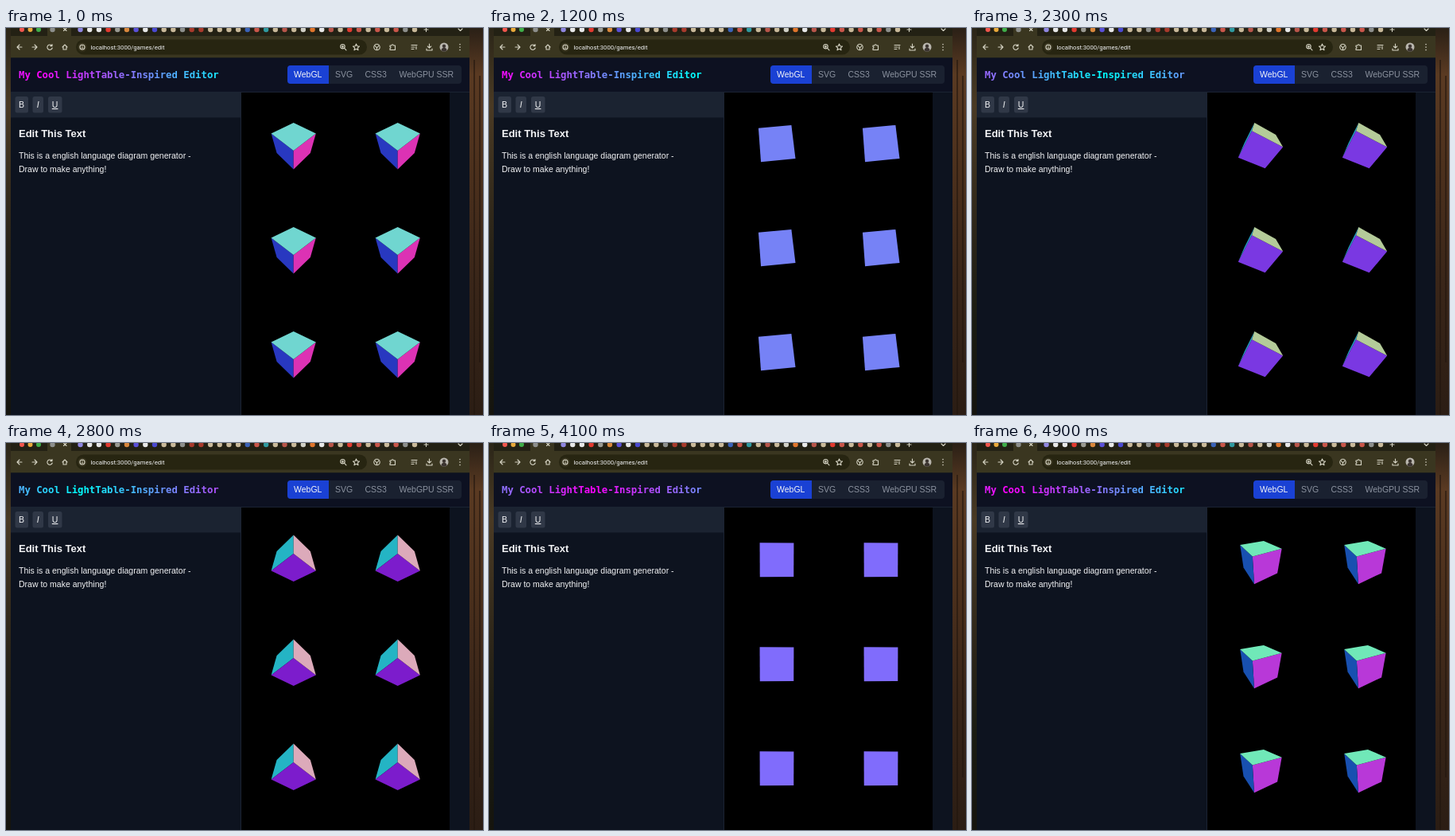
Write an HTML page that moves like this. It is 600 px wide and 486 px high and loops after 5 s.

```html
<!DOCTYPE html>
<html lang="en">
<head>
<meta charset="utf-8">
<title>Editor</title>
<style>
  html, body { margin: 0; width: 100%; height: 100%; overflow: hidden; background: #0d131f; }
  svg { position: absolute; left: 0; top: 0; display: block; }
  text { font-family: "Liberation Sans", Arial, sans-serif; font-size: 10.5px; fill: #f3f4f6; }
  #title {
    position: absolute; left: 16px; top: 50.5px; width: 252px; white-space: nowrap;
    font: bold 12.31px/16px "DejaVu Sans Mono", monospace;
    background: linear-gradient(90deg, #f0f, #0ff, #f0f) 0 0 / 504px 100%;
    -webkit-background-clip: text; background-clip: text; color: transparent;
  }
  .idle { fill: #8b929f; }
  .icon { fill: none; stroke: #d6d4c4; stroke-width: 1.1; stroke-linecap: round; stroke-linejoin: round; }
</style>
</head>
<body>
<svg width="600" height="486" viewBox="0 0 600 486">
  <defs>
    <linearGradient id="bark" x2="0" y2="1">
      <stop offset="0" stop-color="#2a2016"/><stop offset=".12" stop-color="#5a3a22"/>
      <stop offset=".4" stop-color="#4a2f1c"/><stop offset=".65" stop-color="#3a2619"/>
      <stop offset="1" stop-color="#2b1d14"/>
    </linearGradient>
    <linearGradient id="moss" x2="0" y2="1">
      <stop offset="0" stop-color="#2b2618"/><stop offset=".2" stop-color="#4a3a24"/>
      <stop offset=".55" stop-color="#2a2418"/><stop offset=".75" stop-color="#1a1c12"/>
      <stop offset="1" stop-color="#15140e"/>
    </linearGradient>
    <g id="cube"></g>
  </defs>

  <!-- desktop behind the window -->
  <rect width="8" height="486" fill="url(#moss)"/>
  <rect x="582" width="18" height="486" fill="url(#bark)"/>
  <path d="M589 40V486M596 60V420" stroke="#22160e" stroke-width="2" opacity=".6"/>

  <!-- browser frame -->
  <rect x="6" width="577" height="12" fill="#232114"/>
  <rect x="6" y="10" width="577" height="28" fill="#3a3620"/>
  <path d="M52 11V0H82V11Z" fill="#3a3620"/>
  <g id="tabs"></g>
  <g class="icon">
    <path d="M72.5 0L76 3.5M76 0L72.5 3.5M526 2H531M528.5 0V4.5M569 1L571.5 3.5L574 1"/>
    <path d="M20 24H14M17 21L14 24L17 27"/>
    <path d="M33 24H39M36 21L39 24L36 27"/>
    <path d="M57.6 22.2A3.2 3.2 0 1 0 58.2 25M58 20.5V22.6H55.8"/>
    <path d="M71 24L74 21L77 24M72 23.5V27H76V23.5"/>
  </g>
  <rect x="88" y="14.5" width="366" height="19" rx="9.5" fill="#272511"/>
  <circle cx="96" cy="24" r="5.5" fill="#3a3620"/>
  <g class="icon">
    <circle cx="96" cy="24" r="3"/>
    <path d="M96 24V25.5M96 22.4V22.5"/>
    <circle cx="423.5" cy="23.2" r="2.7"/><path d="M425.6 25.4L428 27.8M422.3 23.2H424.7M423.5 22V24.4"/>
    <path d="M440.500 20L441.700 22.700L444.500 23L442.400 24.900L443 27.800L440.500 26.300L438 27.800L438.600 24.900L436.500 23L439.300 22.700Z"/>
    <circle cx="466.500" cy="24" r="3.700"/><path d="M464 22L466.500 25L469 22M466.500 25V27"/>
    <path d="M483 22H485A1.200 1.200 0 0 1 487.400 22H489.500V27.500H483V25.500A1 1 0 0 0 483 23.500Z"/>
    <path d="M510 21.500H517M510 24H514M510 26.500H513M516 26.500V23"/>
    <path d="M532.500 20V25M530.300 23L532.500 25.200L534.700 23M529 26V28H536V26"/>
    <path d="M571 20.500V20.600M571 24V24.100M571 27.500V27.600" stroke-width="1.600"/>
  </g>
  <circle cx="551" cy="24" r="5.500" fill="#b9b6ae"/>
  <path d="M547.500 28.200A3.500 3.500 0 0 1 554.500 28.200A5.500 5.500 0 0 1 547.500 28.200Z" fill="#3b3430"/>
  <circle cx="551" cy="22.700" r="2.200" fill="#3b3430"/>
  <text x="106.500" y="26.700" style="font:7.700px Roboto,sans-serif">localhost:3000/games/edit</text>

  <!-- page header -->
  <rect x="6" y="37.500" width="577" height="449" fill="#0d131f"/>
  <rect x="6" y="37.500" width="577" height="42.500" fill="#0d1121"/>
  <path d="M6 80.500H583" stroke="#1b2332"/>
  <rect x="354" y="47" width="219" height="23" rx="4" fill="#1a2130"/>
  <path d="M406 47H358A4 4 0 0 0 354 51V66A4 4 0 0 0 358 70H406Z" fill="#1a41d4"/>
  <text x="362" y="62">WebGL</text>
  <text class="idle" x="414" y="62">SVG</text>
  <text class="idle" x="451.500" y="62">CSS3</text>
  <text class="idle" x="494.500" y="62">WebGPU SSR</text>

  <!-- editor pane -->
  <rect x="6" y="81" width="289" height="31.500" fill="#1b2331"/>
  <g fill="#303847">
    <rect x="11.500" y="86" width="16.500" height="20.500" rx="2.500"/>
    <rect x="33.500" y="86" width="13.500" height="20.500" rx="2.500"/>
    <rect x="53" y="86" width="17.500" height="20.500" rx="2.500"/>
  </g>
  <text x="16" y="100">B</text>
  <text x="38.700" y="100" font-style="italic">I</text>
  <text x="57.800" y="100" text-decoration="underline">U</text>
  <text x="16" y="136.500" style="font-weight:bold;font-size:13px">Edit This Text</text>
  <text x="16" y="164">This is a english language diagram generator -</text>
  <text x="16" y="181">Draw to make anything!</text>

  <!-- cube pane -->
  <path d="M295.500 81V486" stroke="#1b2332"/>
  <rect x="296" y="81" width="262" height="405"/>
  <g id="grid"></g>
</svg>
<div id="title">My Cool LightTable-Inspired Editor</div>

<script>
const LOOP = 5000, STEP = 100;
const FOCAL = 65.5 / Math.tan(37.5 * Math.PI / 180), CAMERA = 5;
const $ = id => document.getElementById(id);

function add(parent, tag, attrs) {
  const el = document.createElementNS('http://www.w3.org/2000/svg', tag);
  for (const k in attrs) el.setAttribute(k, attrs[k]);
  return parent.appendChild(el);
}

// window buttons and tab icons
['#f2564d', '#e9a93a', '#3fae49'].forEach((fill, i) =>
  add($('tabs'), 'circle', { cx: 20 + i * 10.5, cy: 2, r: 3, fill }));
const tabColors = ('#8d8f8c,,,#8f86e0,#e8e8e8,#e8e8e8,#e23a30,#9a9a92,#d9873c,#5a50d8,#e8e8e8,#4a49d0,' +
  '#c9b99a,#c9b99a,#8d8f8c,#a83a2c,#a83a2c,#c9b99a,#c9b99a,#c9b99a,#c9b99a,#3a62b8,#c9564a,#2f9aa0,' +
  '#c9b99a,#b8554a,#c9b99a,#d0cfc6,#e0752c,#e8e8e8,#b8554a,#c9b99a,#e23a30,#c9564a,#c9b99a,#c9564a,' +
  '#c9b99a,#c9564a,#8d8f8c,#c9b99a').split(',');
tabColors.forEach((fill, i) => {
  if (fill) add($('tabs'), 'circle', { cx: 58.5 + i * 11.68, cy: 2, r: 3.2, fill });
});

for (let row = 0; row < 3; row++)
  for (let col = 0; col < 2; col++)
    add($('grid'), 'use', { href: '#cube', x: 361.7 + col * 131, y: 146.5 + row * 131 });

// [ms, degrees]
const spin = [[0, 45], [700, 69], [1800, 103], [2800, 135], [3600, 165.5], [4100, 181], [4900, 211], [5000, 214.5]];

// face normals with their [ms, r, g, b] shades
const faces = [
  { n: [0, 0, 1], shades: [[0, 40, 56, 192], [700, 24, 80, 176], [2800, 36, 180, 196],
    [3600, 84, 148, 248], [4100, 128, 108, 252], [4900, 184, 56, 216]] },
  { n: [1, 0, 0], shades: [[0, 220, 50, 180], [700, 168, 24, 180], [1800, 90, 16, 150],
    [4100, 20, 110, 190], [4900, 24, 80, 176]] },
  { n: [0, 1, 0], shades: [[0, 112, 214, 208], [700, 116, 168, 244], [1800, 120, 84, 248],
    [2800, 124, 28, 204], [3600, 110, 16, 170]] },
  { n: [-1, 0, 0], shades: [[1800, 140, 235, 120], [2800, 220, 170, 186], [3600, 235, 120, 90]] },
  { n: [0, -1, 0], shades: [[4100, 130, 245, 160], [4900, 112, 232, 184]] },
  { n: [0, 0, -1], shades: [[0, 60, 200, 160]] }
];
for (const f of faces) f.path = add($('cube'), 'path', {});

function sample(keys, t) {
  const i = keys.findIndex(k => k[0] > t);
  if (i === 0) return keys[0].slice(1);
  if (i < 0) return keys[keys.length - 1].slice(1);
  const a = keys[i - 1], b = keys[i], p = (t - a[0]) / (b[0] - a[0]);
  return a.slice(1).map((v, j) => v + (b[j + 1] - v) * p);
}

// turn about y by -angle, then about x by +angle
function turn([x, y, z], angle) {
  const c = Math.cos(angle), s = Math.sin(angle);
  const depth = x * s + z * c;
  return [x * c - z * s, y * c - depth * s, y * s + depth * c];
}

function project([x, y, z]) {
  const k = FOCAL / (CAMERA - z);
  return (x * k).toFixed(2) + ' ' + (-y * k).toFixed(2);
}

function corners(n) {
  const axis = n.findIndex(v => v);
  return [[-1, -1], [1, -1], [1, 1], [-1, 1]].map(([u, v]) => {
    const p = [0, 0, 0];
    p[axis] = n[axis];
    p[(axis + 1) % 3] = u;
    p[(axis + 2) % 3] = v;
    return p;
  });
}

const sweep = $('title').animate(
  [{ backgroundPosition: '0px 0px' }, { backgroundPosition: '-504px 0px' }],
  { duration: LOOP, easing: 'ease-in-out', iterations: Infinity });
sweep.pause();

function draw(t) {
  sweep.currentTime = (t + 4250) % LOOP;
  const angle = sample(spin, t)[0] * Math.PI / 180;
  for (const f of faces) {
    const facing = turn(f.n, angle)[2] * CAMERA > 1;
    f.path.setAttribute('d', facing
      ? 'M' + corners(f.n).map(p => project(turn(p, angle))).join('L') + 'Z' : '');
    f.path.setAttribute('fill', 'rgb(' + sample(f.shades, t).map(Math.round) + ')');
  }
}

const start = performance.now();
function tick() {
  const t = (performance.now() - start) % LOOP;
  draw(Math.floor(t / STEP) * STEP);
  requestAnimationFrame(tick);
}
tick();
</script>
</body>
</html>
```
